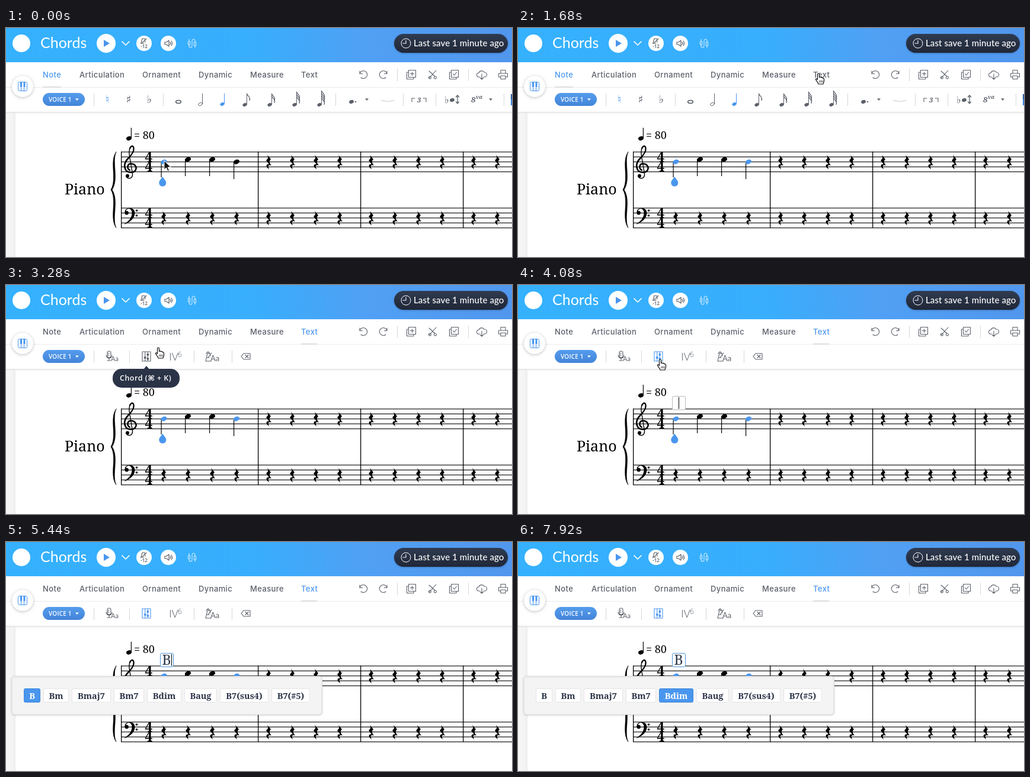
Animation of 854 by 388 pixels, one loop 8000 ms. Source, as an HTML page with a canvas:

```html
<!DOCTYPE html>
<html lang="en">
<head>
<meta charset="utf-8">
<title>Chord entry</title>
<style>
html, body { margin: 0; width: 100%; height: 100%; overflow: hidden; background: #fff; }
canvas { display: block; width: 854px; height: 388px; }
</style>
</head>
<body>
<canvas id="stage"></canvas>
<script>
const W = 854, H = 388, LOOP = 8000, STEP = 80;
const canvas = document.getElementById('stage');
const ctx = canvas.getContext('2d');
const dpr = window.devicePixelRatio || 1;
canvas.width = W * dpr;
canvas.height = H * dpr;

const BLUE = '#4a96ee', GREY = '#5b6069', INK = '#000', DARK = '#2b3447';
const SANS = '"Open Sans", sans-serif', SERIF = '"Noto Serif", serif';
const LATO = 'Lato, sans-serif', INTER = 'Inter, sans-serif', SYMBOL = '"DejaVu Sans", sans-serif';

// Times of the user's actions, in ms
const SELECT = 880, OPEN_TEXT = 1840, TIP = 3120, OPEN_BOX = 3920, TYPE = 5360;
const PICKS = [6080, 6480, 6960, 7520];
const CHIPS = [['B', 30, 57], ['Bm', 63, 105], ['Bmaj7', 111, 176], ['Bm7', 182, 232],
  ['Bdim', 238, 295], ['Baug', 301, 355], ['B7(sus4)', 361, 442], ['B7(#5)', 448, 512]];
const TABS = [['Note', 62, 93], ['Articulation', 124], ['Ornament', 230], ['Dynamic', 325],
  ['Measure', 412], ['Text', 498, 525]];

// Pointer stops: start, end, x, y
const MOVES = [[0, 0, 267, 225], [320, 800, 389, 226], [1040, 1600, 507, 77],
  [2240, 3200, 257, 106], [3360, 3840, 240, 126]];

function text(str, x, y, font, color, align = 'left', spacing = 0) {
  ctx.font = font;
  ctx.fillStyle = color;
  ctx.textAlign = align;
  ctx.letterSpacing = spacing + 'px';
  ctx.fillText(str, x, y);
}

function rect(x, y, w, h, color) {
  ctx.fillStyle = color;
  ctx.fillRect(x, y, w, h);
}

function round(x, y, w, h, r, fill, stroke) {
  ctx.beginPath();
  ctx.roundRect(x, y, w, h, r);
  paint(fill, stroke, 1);
}

function paint(fill, stroke, width) {
  if (fill) { ctx.fillStyle = fill; ctx.fill(); }
  if (stroke) { ctx.strokeStyle = stroke; ctx.lineWidth = width; ctx.stroke(); }
}

function oval(x, y, rx, ry, fill, stroke, tilt = 0, width = 1) {
  ctx.beginPath();
  ctx.ellipse(x, y, rx, ry, tilt, 0, Math.PI * 2);
  paint(fill, stroke, width);
}

const disc = (x, y, r, fill, stroke) => oval(x, y, r, r, fill, stroke);

function shape(d, x, y, fill, stroke, width = 1) {
  const p = new Path2D(d);
  ctx.save();
  ctx.translate(x, y);
  if (fill) { ctx.fillStyle = fill; ctx.fill(p); }
  if (stroke) {
    ctx.strokeStyle = stroke;
    ctx.lineWidth = width;
    ctx.lineCap = ctx.lineJoin = 'round';
    ctx.stroke(p);
  }
  ctx.restore();
}

const icon = (d, x, y, color = GREY, width = 1.1) => shape(d, x, y, null, color, width);
const caret = (x, y, color) => shape('M-3 -1.5H3L0 2Z', x, y, color);

function shadow(color, blur, dy, draw) {
  ctx.save();
  ctx.shadowColor = color;
  ctx.shadowBlur = blur * dpr;
  ctx.shadowOffsetY = dy * dpr;
  draw();
  ctx.restore();
}

function header() {
  const g = ctx.createLinearGradient(0, 60, 840, 0);
  g.addColorStop(0, '#35b1fd');
  g.addColorStop(0.5, '#38aefc');
  g.addColorStop(0.72, '#50a0f4');
  g.addColorStop(1, '#5197ee');
  rect(0, 0, W, 58, g);
  disc(26, 26, 15, '#fff');
  text('Chords', 58, 34, '25px ' + LATO, '#fff');

  disc(169, 26, 16, '#fff');
  shape('M-4 -6L6 0L-4 6Z', 169, 26, BLUE);
  icon('M-6 -3L0 3L6 -3', 202, 26, '#fff', 1.7);

  disc(233, 26, 13, '#fff');
  icon('M-5 0L-3 -8H1L2 -2M-3 -1L4 -8M-6 0H0', 233, 26, GREY, 1.1);
  text('-12', 233, 34, '600 8px ' + SANS, GREY, 'center');

  disc(274, 26, 13, '#fff');
  icon('M-6 -2H-3L1 -5V5L-3 2H-6ZM3 -2Q5 0 3 2M5 -4Q8 0 5 4', 274, 26, GREY, 1.2);
  icon('M-5 -7V-3M-6.5 -3H-3.5V2H-6.5ZM-5 2V4Q-5 7 -2.500 7Q0 7 0 4V-3Q0 -7 2.500 -7Q5 -7 5 -3V-2M3.500 -2H6.500V4H3.500ZM5 4V7',
    314, 26, '#d5efff');

  const p = ctx.createLinearGradient(0, 10, 0, 42);
  p.addColorStop(0, '#303b50');
  p.addColorStop(1, '#202737');
  shadow('rgba(20,40,80,.35)', 3, 1, () => round(655, 10, 192, 32, 16, p));
  disc(675, 26, 8, null, '#fff');
  icon('M0 -5V0H-5', 675, 26, '#fff');
  text('Last save 1 minute ago', 688, 31, '500 15px ' + LATO, '#fff', 'left', 0.1);
}

function editIcons() {
  const undo = 'M-6 -6V-1.500H-1.500M-6 -2A6.500 6.500 0 1 1 -4 5';
  icon(undo, 603, 79);
  ctx.save();
  ctx.translate(637, 79);
  ctx.scale(-1, 1);
  icon(undo, 0, 0);
  ctx.restore();
  const sheets = 'M-4.500 -7.500H7.500V4.500H-4.500ZM-4.500 -4H-7.500V7.500H4V4.500';
  icon(sheets + 'M1.500 -4.500V1.500M-1.500 -1.500H4.500', 684, 79);
  icon('M-6 -6L4 3M-6 6L6 -7M4 3A2 2 0 1 1 4 6.900A2 2 0 0 1 4 3M-5 3A2 2 0 1 1 -5 6.900A2 2 0 0 1 -5 3', 720, 79);
  icon(sheets + 'M-1.500 -1.500L0.500 1L4.500 -4', 756, 79);
  icon('M-3 4H-5A3.500 3.500 0 0 1 -5 -3A5 5 0 0 1 4 -4A4 4 0 0 1 5 4H3M0 -1V8M-2.500 5.500L0 8L2.500 5.500', 803, 79);
  icon('M-4 -2V-7.500H4V-2M-4 4H-7.500V-2H7.500V4H4M-4 2H4V7.500H-4Z', 839, 79);
}

function toolbar(active) {
  rect(0, 58, W, 84, '#fff');
  rect(0, 100, W, 1, '#ececee');
  for (const [name, x, end] of TABS) {
    const on = name === active;
    text(name, x, 84, '500 13px ' + INTER, on ? BLUE : GREY, 'left', 0.4);
    if (on) rect(x, 99, end - x, 2, '#dcdde0');
  }
  editIcons();
  rules([660, 780], 69);

  const g = ctx.createLinearGradient(0, 110, 0, 132);
  g.addColorStop(0, '#559ced');
  g.addColorStop(1, '#4284d8');
  round(62, 110, 71, 22, 11, g);
  text('VOICE 1', 72, 125, '600 10px ' + SANS, '#fff', 'left', 0.2);
  caret(120, 121, '#fff');

  shadow('rgba(0,0,0,.25)', 5, 1, () => disc(28, 99, 18, '#fff'));
  round(20.5, 91.500, 15, 15, 2, null, BLUE);
  icon('M-2.500 1V7M2.500 1V7', 28, 99.5, BLUE);
  rect(24, 92, 3, 8, BLUE);
  rect(29.5, 92, 3, 8, BLUE);
}

function rules(xs, y) {
  for (const x of xs) rect(x, y, 1, 21, '#d6d7da');
}

function noteIcon(x, y, top, flags, color, hollow) {
  oval(x, y, 3.4, 2.3, hollow ? null : color, color, -0.4);
  rect(x + 3, top, 1, y - top, color);
  for (let i = 0; i < flags; i++) icon('M0 0C1 4 7 5 4.500 11', x + 3.5, top + 0.5 + i * 4, color, 1.3);
}

function noteTools() {
  rules([148, 265, 556, 670, 725, 840], 111);
  text('♮', 171, 127, '18px ' + SYMBOL, BLUE, 'center');
  text('♯', 207, 127, '18px ' + SYMBOL, GREY, 'center');
  text('♭', 242, 127, '18px ' + SYMBOL, GREY, 'center');
  oval(291, 125, 4.3, 2.5, null, GREY, 0, 1.7);
  noteIcon(328, 129, 111, 0, GREY, true);
  noteIcon(365, 129, 111, 0, BLUE);
  noteIcon(403, 130, 111, 1, GREY);
  noteIcon(445, 130, 111, 2, GREY);
  noteIcon(487, 130, 108, 3, GREY);
  noteIcon(529, 130, 106, 4, GREY);
  oval(583, 125, 4, 3, GREY, null, -0.4);
  disc(590, 125, 1.2, GREY);
  caret(609, 121, GREY);
  icon('M-11 -1Q0 4 11 -1', 644, 123, '#cfd1d5');
  icon('M-12 4V-2H-7M7 -2H12V4', 697, 121);
  text('3', 697, 126, 'italic 600 11px ' + SERIF, GREY, 'center');
  text('♭', 744, 127, '17px ' + SYMBOL, GREY, 'center');
  oval(753, 122, 4, 3, GREY, null, -0.4);
  icon('M0 -7V7M-2.500 -4L0 -7L2.500 -4M-2.500 4L0 7L2.500 4', 762, 121, GREY, 1.3);
  text('8', 785, 126, 'italic 600 13px ' + SERIF, GREY);
  text('va', 793, 120, 'italic 600 9px ' + SERIF, GREY);
  caret(818, 121, GREY);
  rect(852, 112, 2, 9, '#315f9f');
  rect(852, 121, 2, 10, '#3f88e0');
}

function textTools(chordOn) {
  rules([148, 208, 317, 381], 111);
  icon('M-3 -7A3 3 0 0 1 3 -7V-2A3 3 0 0 1 -3 -2ZM-5 -3A5 5 0 0 0 5 -3M0 2V6M-3 6H2M-3 -6H0M-3 -3H0', 174, 122);
  text('Aa', 177, 129, '11px ' + LATO, GREY);

  const c = chordOn ? BLUE : GREY;
  icon('M-7 -8H7V8H-7ZM-2.300 -8V8M2.300 -8V8', 237, 121, c);
  disc(234.7, 123, 2, c);
  disc(239.3, 118, 2, c);
  disc(239.3, 125, 2, c);

  text('IV', 275, 128, '300 19px ' + SANS, GREY);
  text('6', 290, 122, '300 12px ' + SANS, GREY);
  icon('M-6 7H3M-6 7L-3 -6H1L2 -2M-4 1H0M-2 1L4 -7M-2 -9L-5 -6M-2 -9L1 -6', 343, 122);
  text('Aa', 345, 129, '13px ' + LATO, GREY);
  icon('M-8 0L-4 -5H7V5H-4ZM-1 -2.500L4 2.500M4 -2.500L-1 2.500', 405, 121);
}

function page() {
  rect(0, 142, W, H - 142, '#fff');
  const side = ctx.createLinearGradient(0, 0, 17, 0);
  side.addColorStop(0, '#f7f7f8');
  side.addColorStop(0.7, '#f3f3f4');
  side.addColorStop(1, '#e9e9eb');
  rect(0, 142, 16, H - 142, side);
  const top = ctx.createLinearGradient(0, 142, 0, 148);
  top.addColorStop(0, '#dfe0e2');
  top.addColorStop(1, 'rgba(255,255,255,0)');
  rect(0, 142, W, 6, top);
}

function note(x, y, bottom, color) {
  rect(x - 5, y, 1.2, bottom - y, INK);
  oval(x, y, 5.3, 3.7, color, null, -0.35);
}

const REST = 'M-2.500 -12.500L4 -4.500C1 -1 1 1 5 6C0 4 -2 7 1.500 12.500C-5 9 -5 3 1 4L-4 -2.500C0 -6 0 -8 -2.500 -12.500Z';

function rests(y, first) {
  const starts = [266, 443, 616, 789];
  starts.slice(first).forEach((x, i) => {
    const gap = i + first ? 40 : 41;
    for (let k = 0; k < 4; k++) shape(REST, x + k * gap, y, INK);
  });
}

function clefs() {
  shape('M209 241C203.500 238 204.500 230 211 230C218 230 221 236 219 240C216.500 246 206 246 202 240.500C198 233 201 226 207 220', 0, 0, null, INK, 2.5);
  shape('M207 220C213 214 216.500 209 215.500 203C214.500 198.500 211 199.500 209 204', 0, 0, null, INK, 2.3);
  shape('M209 204C207 209 207.500 213 209 220L213.500 247C214 255 207 257 203 252', 0, 0, null, INK, 1.4);
  disc(205, 250.5, 3, INK);

  shape('M200.500 313C199.500 302.500 217.500 302 217.500 313.500C217.500 323 208 330 199 333C207 327 212.500 322 212.500 313C212.500 305 204 304 202.500 310Z', 0, 0, INK);
  disc(203.7, 313.2, 3.2, INK);
  disc(220.5, 309.3, 1.8, INK);
  disc(220.5, 317.7, 1.8, INK);
}

function score(both) {
  oval(207.5, 187, 4.6, 3.4, INK, null, -0.35);
  rect(210.8, 169, 1.2, 18, INK);
  text('= 80', 216, 188, '18px ' + SERIF, INK);
  text('Piano', 99, 282, '25px ' + SERIF, INK);
  shape('M186 210C174 226 188 256 177 274C188 292 174 322 186 338.500C178 322 191 292 179 274C191 256 178 226 186 210Z', 0, 0, INK, INK, 0.7);

  for (const top of [210, 305]) {
    for (let i = 0; i < 5; i++) rect(194, top - 0.5 + i * 8.4, W - 194, 1.1, INK);
    for (const base of [16.5, 33.3]) text('4', 241, top + base, '900 23px ' + SERIF, INK, 'center');
  }
  for (const x of [194, 425, 598, 771]) rect(x, 209.5, 1.3, 129.5, INK);
  clefs();

  note(266.5, 226.7, 253, BLUE);
  note(307, 222.7, 251, INK);
  note(348, 222.7, 251, INK);
  note(389, 226.7, 256, both ? BLUE : INK);
  shape('M0 -8.500C2 -4 6 -2 6 2.500A6 6 0 0 1 -6 2.500C-6 -2 -2 -4 0 -8.500Z', 264.3, 260, BLUE);
  rests(226.8, 1);
  rests(321.8, 0);
}

function chordBox(t) {
  const typed = t >= TYPE;
  round(260.5, 188.5, 22, 23, 2.5, '#fff', typed ? '#4f93d8' : '#b5b8bd');
  if (typed) text('B', 263.5, 208, '23px ' + SERIF, DARK);
  if ((t - (typed ? TYPE : OPEN_BOX)) % 1000 < 500) rect(typed ? 279 : 271, 190, 1, 20, INK);
}

function suggestions(t) {
  shadow('rgba(0,0,0,.12)', 3, 1, () => round(9.5, 227.5, 524, 65, 5, '#f4f4f4', '#dcdcdc'));
  const pick = PICKS.filter(p => t >= p).length;
  CHIPS.forEach(([name, x, end], i) => {
    const on = i === pick;
    round(x + 0.5, 248.5, end - x, 23, 2, on ? BLUE : '#fff', on ? '#3f88dc' : '#e4e4e4');
    text(name, (x + end) / 2 + 0.5, 266, '700 14.500px ' + SERIF, on ? '#fff' : DARK, 'center');
  });
}

function tooltip() {
  shape('M-5 5L0 -1L5 5Z', 237, 138, DARK);
  round(180, 142, 113, 32, 15, DARK);
  text('Chord (⌘ + K)', 192, 162, '600 12.500px "Open Sans", "DejaVu Sans", sans-serif', '#fff', 'left', 0.5);
}

const ease = u => u * u * (3 - 2 * u);

function pointer(t) {
  let [, , x, y] = MOVES[0];
  for (const [from, to, nx, ny] of MOVES.slice(1)) {
    if (t <= from) break;
    const k = ease(Math.min(1, (t - from) / (to - from)));
    x += (nx - x) * k;
    y += (ny - y) * k;
  }
  if (y < 136 && t > SELECT) {
    shape('M-1.500 1.500C-1.500 -0.500 1.500 -0.500 1.500 1.500V6.500C2 5.500 4 5.500 4.500 7C5.500 6 7 6.500 7.200 8C8.500 7.500 9.500 8.500 9.500 10V13C9.500 15 8 16 8 18H0C-0.500 15 -4 12 -4.500 10C-4.500 8.500 -3 8.500 -1.500 10.500Z', x, y, '#fff', '#111', 1.2);
    icon('M2 12V15M4.500 12V15M7 12V15', x, y, '#111', 0.9);
  } else {
    shape('M0 0V15L3.500 11.800L6 17.500L8.500 16.400L6 10.900H11Z', x, y, '#111', '#fff', 1);
  }
}

function draw(t) {
  ctx.setTransform(dpr, 0, 0, dpr, 0, 0);
  const textTab = t >= OPEN_TEXT;
  page();
  score(t >= SELECT);
  if (t >= TYPE) suggestions(t);
  if (t >= OPEN_BOX) chordBox(t);
  header();
  toolbar(textTab ? 'Text' : 'Note');
  if (textTab) textTools(t >= OPEN_BOX);
  else noteTools();
  if (t >= TIP && t < OPEN_BOX) tooltip();
  if (t < TYPE) pointer(t);
}

const start = performance.now();
function frame() {
  const t = (performance.now() - start) % LOOP;
  draw(Math.floor(t / STEP) * STEP);
  requestAnimationFrame(frame);
}
frame();
</script>
</body>
</html>
```
